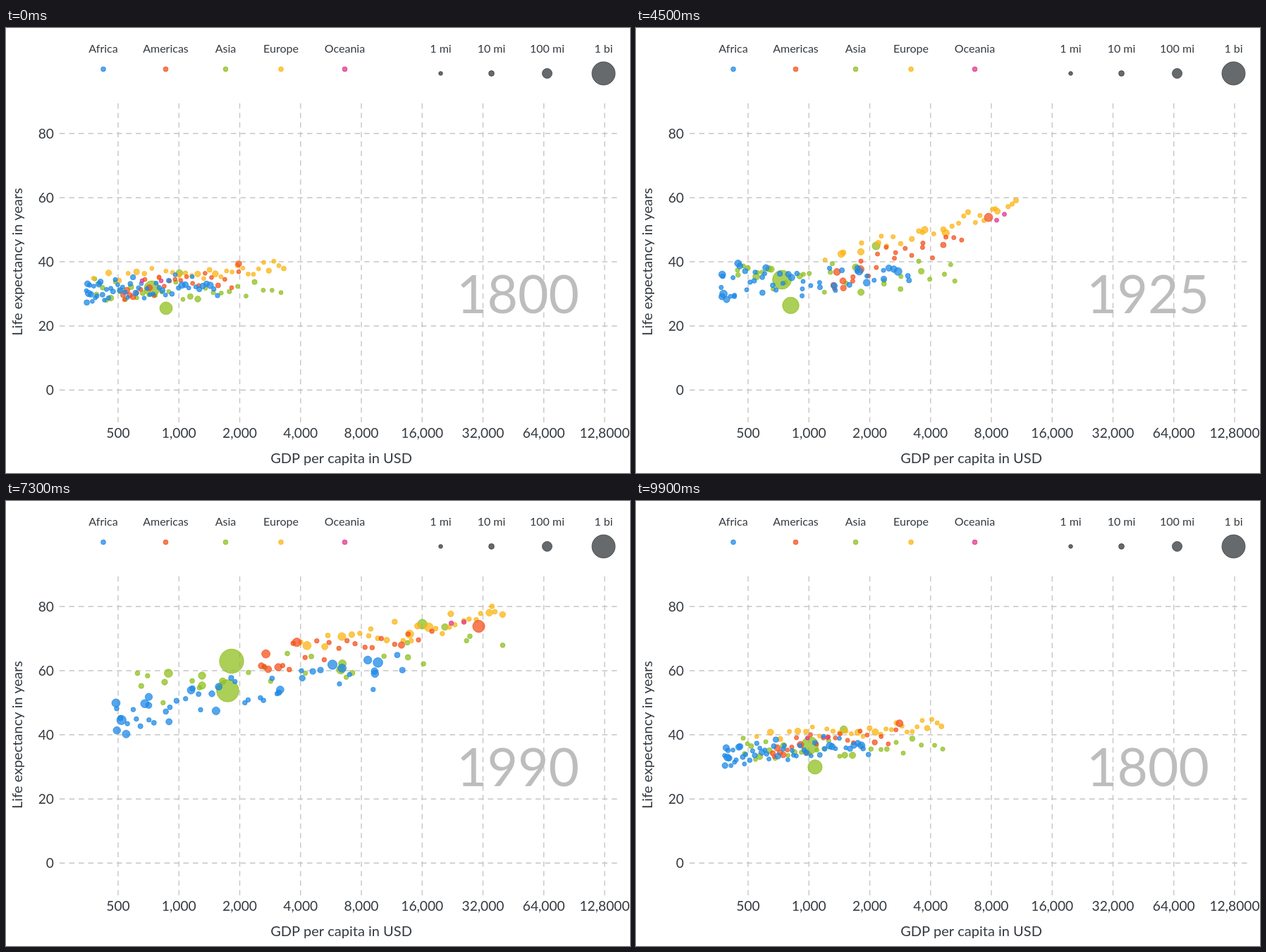
Recreate the animation shown at these times as an HTML page with a canvas. Size 885 px wide and 632 px high, loop 10000 ms.

```html
<!DOCTYPE html>
<html lang="en">
<head>
<meta charset="utf-8">
<title>Life expectancy and income</title>
<style>
html, body { margin: 0; width: 100%; height: 100%; overflow: hidden; background: #fff; }
canvas { display: block; }
</style>
</head>
<body>
<canvas id="stage" width="885" height="632"></canvas>
<script>
const ctx = document.getElementById('stage').getContext('2d');
const LOOP = 10000, STEP = 100, TAU = Math.PI * 2;
const INK = '#343a40', GRID = '#c6c6c6', GREY = '#33383b';
const BLUE = '#1e88e5', ORANGE = '#f4511e', GREEN = '#8fbf1f', YELLOW = '#fbb414', PINK = '#e0368c';
const years = [1800, 1825, 1850, 1875, 1900, 1925, 1950, 1975, 1990, 2000, 2010];

// Keyframe positions counted in states; the last one leads back to the first.
const keys = [0, 3.85, 6.05, 7.15, 8.91, 10, 11];
const dots = [];

let seed = 11;
const rnd = () => (seed = (seed * 16807) % 2147483647) / 2147483647;
const lerp = (a, b, k) => a + (b - a) * k;

function addDot(color, r0, r1, path) {
  const pts = path.map(([x, y], k) => [x, y, lerp(r0, r1, (keys[k] / 10) ** 2)]);
  dots.push({ color, pts: [...pts, pts[0]] });
}

// Each row holds the left and right end of the trend line: x0, x1, y0, y1.
// skew gathers the dots at the left (> 1) or right (< 1) end.
function addCrowd(color, n, skew, scatter, rows) {
  for (let i = 0; i < n; i++) {
    const rank = i / (n - 1), level = rnd() - .5, big = rnd() ** 4;
    addDot(color, 2.9 + 1.8 * big, 3.4 + 4.6 * big, rows.map(([x0, x1, y0, y1], k) => {
      const shift = k ? .1 * scatter * (rnd() - .5) : 0;
      const u = Math.min(1, Math.max(0, rank + shift)) ** skew;
      // Differences between countries peak in the twentieth century.
      const spread = scatter * (22 + 22 * Math.sin(Math.PI * (keys[k] / 10) ** 2));
      return [lerp(x0, x1, u), lerp(y0, y1, u) + spread * (level + rnd() - .5)];
    }));
  }
}

// The largest countries follow their own paths.
addDot(GREEN, 11, 20.5, [[207, 370], [211, 368], [203, 347], [212, 272], [428, 183], [568, 160]]);
addDot(GREEN, 9, 19.5, [[227, 398], [210, 415], [229, 373], [247, 315], [382, 224], [472, 214]]);
addDot(GREEN, 4.8, 8, [[246, 348], [299, 342], [382, 277], [495, 208], [686, 142], [688, 133]]);

addCrowd(GREEN, 30, 1.4, 1.1, [
  [126, 390, 373, 374], [139, 430, 370, 372], [149, 497, 345, 325],
  [163, 643, 310, 240], [210, 770, 235, 150], [360, 800, 200, 145]
]);
addCrowd(YELLOW, 30, .75, .6, [
  [124, 394, 350, 342], [240, 490, 348, 302], [285, 590, 305, 205],
  [347, 660, 230, 178], [467, 752, 180, 148], [540, 755, 168, 143]
]);
addCrowd(ORANGE, 24, 1.4, .8, [
  [166, 330, 372, 355], [240, 412, 370, 345], [320, 520, 345, 240],
  [354, 562, 262, 215], [370, 650, 190, 162], [420, 690, 175, 150]
]);
addDot(ORANGE, 4.2, 11, [[330, 335], [445, 313], [555, 225], [617, 193], [724, 163], [728, 160]]);
addCrowd(BLUE, 52, 1.45, 1, [
  [114, 300, 375, 367], [116, 350, 375, 362], [123, 430, 356, 333],
  [130, 520, 328, 262], [181, 615, 285, 205], [220, 570, 260, 190]
]);
addCrowd(PINK, 2, 1, 0, [
  [193, 220, 359, 359], [479, 494, 323, 317], [544, 551, 223, 212],
  [599, 602, 191, 191], [664, 697, 156, 153], [650, 690, 155, 150]
]);

function circle(x, y, r, color) {
  ctx.beginPath();
  ctx.arc(x, y, r, 0, TAU);
  ctx.fillStyle = ctx.strokeStyle = color;
  ctx.globalAlpha = .75;
  ctx.fill();
  ctx.lineWidth = 1;
  ctx.stroke();
  ctx.globalAlpha = 1;
}

function text(str, x, y, size, align = 'center', color = INK) {
  ctx.font = `${size}px Lato, "Open Sans", sans-serif`;
  ctx.textAlign = align;
  ctx.fillStyle = color;
  ctx.fillText(str, x, y);
}

function line(x1, y1, x2, y2) {
  ctx.beginPath();
  ctx.moveTo(x1, y1);
  ctx.lineTo(x2, y2);
  ctx.stroke();
}

function drawChart() {
  ctx.strokeStyle = GRID;
  ctx.lineWidth = 1.4;
  ctx.setLineDash([7.5, 6]);
  ['500', '1,000', '2,000', '4,000', '8,000', '16,000', '32,000', '64,000', '12,8000'].forEach((label, i) => {
    const x = 159 + 86.25 * i;
    line(x, 560, x, 104);
    text(label, x, 582, 19.2);
  });
  for (let v = 0; v <= 80; v += 20) {
    const y = 514.3 - v * 4.556;
    line(76, y, 871, y);
    text(v, 68, y + 7, 19.2, 'right');
  }
  ctx.setLineDash([]);

  text('GDP per capita in USD', 475.5, 618, 20);
  ctx.save();
  ctx.translate(23, 332);
  ctx.rotate(-Math.PI / 2);
  text('Life expectancy in years', 0, 0, 20);
  ctx.restore();

  [['Africa', 138, BLUE], ['Americas', 226.5, ORANGE], ['Asia', 311.5, GREEN],
   ['Europe', 390, YELLOW], ['Oceania', 480.5, PINK]].forEach(([name, x, color]) => {
    text(name, x, 34.5, 16);
    circle(x, 58.5, 3.4, color);
  });
  [['1 mi', 616.5, 2.8], ['10 mi', 688.5, 3.9], ['100 mi', 767.5, 7], ['1 bi', 847.5, 16.5]].forEach(([name, x, r]) => {
    text(name, x, 34.5, 16);
    circle(x, 64.5, r, GREY);
  });
}

function draw() {
  const t = Math.floor(performance.now() % LOOP / STEP) * STEP;
  const state = t / LOOP * years.length;
  let k = 0;
  while (state >= keys[k + 1]) k++;
  const f = (state - keys[k]) / (keys[k + 1] - keys[k]);

  ctx.fillStyle = '#fff';
  ctx.fillRect(0, 0, 885, 632);
  drawChart();
  text(years[Math.round(state) % years.length], 813, 405, 75, 'right', '#bdbdbd');
  for (const { color, pts } of dots) {
    const [x, y, r] = pts[k].map((v, i) => lerp(v, pts[k + 1][i], f));
    circle(x, y, r, color);
  }
  requestAnimationFrame(draw);
}
draw();
</script>
</body>
</html>
```
